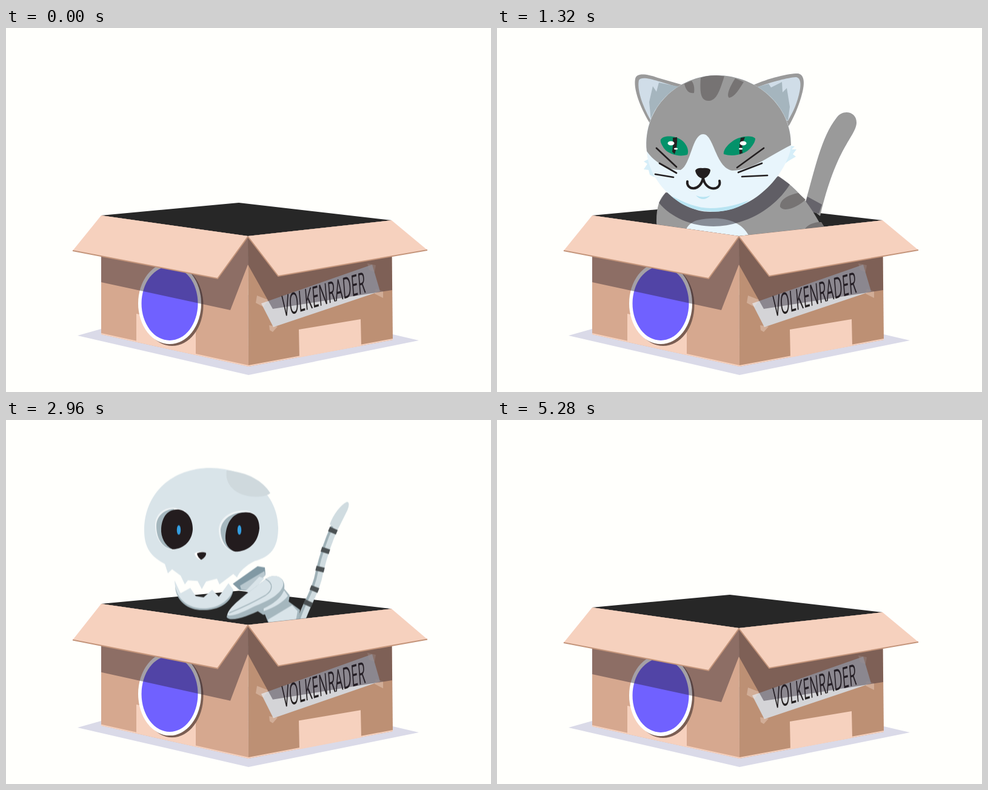
Animation, 800 px wide and 600 px high, one loop 5480 ms. Source, as an HTML page:

```html
<!DOCTYPE html>
<html lang="en">
<head>
<meta charset="utf-8">
<title>Cat in a box</title>
<style>
@property --s { syntax: "<number>"; inherits: true; initial-value: 1; }

html, body { margin: 0; width: 100%; height: 100%; overflow: hidden; background: #fffffc; }
svg { display: block; width: 800px; height: 600px; }

/* --s is the height of the box; .unbox undoes it for whoever sits inside */
svg, .anim { animation: 5480ms ease-in-out infinite; }
svg { animation-name: squash; }
.box { transform: scaleY(var(--s)); transform-origin: 0 558px; }
.unbox { transform: scaleY(calc(1 / var(--s))); transform-origin: 0 558px; }

/* paths morph between the shapes --a, --b and --m */
.flap { animation-name: flap; d: var(--a); }
.pose { animation-name: pose; d: var(--a); }
.bones { animation-name: bones; d: var(--a); }

.cat { animation-name: cat; }
.body { animation-name: body; transform-origin: 350px 320px; }
.head { animation-name: head; transform-origin: 346px 194px; }
.stripes { animation-name: stripes; transform-origin: 350px 80px; }
.gaze { animation-name: gaze; }
.pupil { animation-name: squint; transform-origin: 346px 194px; }
.skel { animation-name: skel; }
.skull { animation-name: skull; transform-origin: 338px 88px; }
.face { animation-name: face; }
.jaw { animation-name: jaw; }
.look { animation-name: look; transform-origin: 335px 200px; }

@keyframes squash {
  0%, 0.73% { --s: 1 }
  2.19% { --s: .97 }
  3.8% { --s: 1.04 }
  5.2% { --s: 1 }
  7.3% { --s: .956 }
  9.5% { --s: .975 }
  11.7%, 31% { --s: 1 }
  34.3% { --s: .965 }
  37.6% { --s: 1.04 }
  40.15% { --s: 1.024 }
  42.4% { --s: .975 }
  44.5%, 47.4% { --s: 1 }
  48.9% { --s: .97 }
  50.7% { --s: 1.04 }
  54% { --s: 1.024 }
  57%, 88.3% { --s: 1 }
  90.5% { --s: .97 }
  92.7% { --s: 1.035 }
  94.9% { --s: .98 }
  96.35%, 100% { --s: 1 }
}
@keyframes flap {
  0%, 1.5% { d: var(--a) }
  4% { d: var(--b) }
  7%, 33.5% { d: var(--a) }
  37.8% { d: var(--b) }
  40.15% { d: var(--m) }
  41.6%, 48.5% { d: var(--a) }
  51% { d: var(--b) }
  54%, 90.5% { d: var(--a) }
  92.7% { d: var(--b) }
  95.5%, 100% { d: var(--a) }
}
@keyframes pose {
  0%, 8.8% { d: var(--a) }
  20%, 31.4% { d: var(--b) }
  39.5%, 100% { d: var(--m) }
}
@keyframes cat {
  0%, 1.8% { transform: translateY(300px); animation-timing-function: ease-in }
  3.3% { transform: translateY(110px); animation-timing-function: ease-out }
  4.9% { transform: translateY(-32px) }
  7.3%, 31.4% { transform: none }
  34.3% { transform: translateY(12px) }
  38% { transform: translateY(-39px) }
  40.15%, 40.9% { transform: translateY(-42px); animation-timing-function: ease-in }
  44.5%, 100% { transform: translateY(300px) }
}
@keyframes body {
  0%, 8.8% { transform: translate(3px, 6px) rotate(-4deg) }
  20%, 31.4% { transform: none }
  39.5%, 100% { transform: translateX(2px) }
}
@keyframes head {
  0%, 8.8% { transform: translate(-11.5px, 8px) rotate(-4.5deg) }
  20%, 31.4% { transform: none }
  39.5%, 100% { transform: translate(6px, 7.5px) scaleY(.98) }
}
@keyframes stripes {
  0%, 8.8% { transform: scaleY(1.18) }
  20%, 31.4% { transform: none }
  39.5%, 100% { transform: scaleY(.92) }
}
@keyframes gaze {
  0%, 31.4% { transform: none }
  39.5%, 100% { transform: translateY(-13px) }
}
@keyframes squint {
  0%, 31.4% { transform: none }
  39.5%, 100% { transform: scaleY(.66) }
}
@keyframes skel {
  0%, 48.2% { transform: translateY(300px); animation-timing-function: ease-in }
  49.6% { transform: translateY(120px); animation-timing-function: ease-out }
  51.3% { transform: translateY(-15px) }
  54% { transform: translateY(-7px) }
  57%, 88.3% { transform: none }
  90.2% { transform: translateY(8px) }
  92.3%, 92.8% { transform: translateY(-14px); animation-timing-function: ease-in }
  96.3%, 100% { transform: translateY(300px) }
}
@keyframes skull {
  0%, 54% { transform: translateY(-2px) scaleY(.965) }
  57.6% { transform: none }
  62% { transform: rotate(1.4deg) }
  67%, 78% { transform: none }
  82% { transform: rotate(1.6deg) }
  87%, 100% { transform: none }
}
@keyframes face {
  0%, 54% { transform: translateY(-4px) }
  57.6%, 100% { transform: none }
}
@keyframes jaw {
  0%, 54% { transform: translateY(3px) }
  57.6%, 70.1% { transform: none }
  72% { transform: translateY(-2px) }
  74% { transform: translateY(2px) }
  76%, 100% { transform: none }
}
@keyframes look {
  0%, 54% { transform: translateY(-2px) scaleY(.82) }
  57.6%, 70.1% { transform: none }
  73%, 76% { transform: translateX(4px) }
  79%, 100% { transform: none }
}
@keyframes bones {
  0%, 54% { d: var(--b) }
  62% { d: var(--a) }
  66% { d: var(--b) }
  70.1% { d: var(--a) }
  78% { d: var(--b) }
  85%, 100% { d: var(--a) }
}

.paper { fill: #f6d1be }
.shade { fill: rgb(40 30 45 / .42) }
.edge { stroke: #c4957b; stroke-width: 2; fill: none }
.fur { fill: #9a9a9a }
.stripe { fill: #767373 }
.inner { fill: #d0dde8 }
.tuft { fill: #a5b5be }
.white { fill: #e8f5fc }
.chin { fill: #b8e4f2 }
.ink { fill: #231f20 }
.line { fill: none; stroke: #231f20; stroke-linecap: round }
.bone { fill: #d9e4e9 }
.dim { fill: #a5b7be }
.socket { fill: #231c1e }
.glow { fill: #349ee0 }
.shine { fill: #fff }
</style>
</head>
<body>
<svg viewBox="0 0 800 600">
  <clipPath id="rim"><path d="M0-300H800V317H636L399 343 157 309H0Z"/></clipPath>

  <path fill="#dadae8" d="M118 507 157 496 400 440 638 505 681 515 400 572Z"/>

  <g class="box">
    <path fill="#272727" d="M157 309 384 288 636 317 399 343Z"/>

    <g clip-path="url(#rim)"><g class="unbox">
      <g class="anim cat">
        <path class="anim pose fur" style="
          --a:path('M492 275C510 225 540 180 567 160C585 148 606 163 598 180C590 196 545 215 518 295Z');
          --b:path('M508 290C525 230 535 180 560 148C570 133 594 137 593 157C591 180 560 195 533 310Z');
          --m:path('M518 342C540 272 560 212 569 168C572 146 598 146 597 168C596 202 570 272 540 352Z')"/>
        <path class="anim pose" fill="#66646b" style="
          --a:path('M494 300L516 310L512 325L490 318Z');
          --b:path('M512 278L536 291L531 306L505 300Z');
          --m:path('M531 298L553 314L541 347L518 332Z')"/>
        <g class="anim body">
          <path class="fur" d="M275 420 270 365C258 320 262 285 278 272L465 245C505 270 530 310 556 372L565 420Z"/>
          <path class="stripe" d="M467 295C466 283 480 275 497 272L509 283C500 292 475 306 467 295ZM505 339C506 327 521 319 535 320L547 339C531 349 507 353 505 339Z"/>
          <path class="white" d="M303 366C306 340 312 322 330 317C370 308 402 318 414 340C420 355 430 366 436 372L400 420H310Z"/>
          <path fill="rgb(40 36 50 / .5)" d="M267 288C295 322 350 337 400 320C440 308 468 282 483 258L464 244 278 271Z"/>
        </g>
        <g class="anim head">
          <path class="anim pose fur" style="
            --a:path('M254 160C232 135 220 108 222 89C223 80 240 79 262 85L308 95L300 160Z');
            --b:path('M254 160C235 130 225 100 228 84C230 74 245 75 265 82L310 95L300 160Z');
            --m:path('M252 160C240 125 241 95 244 80C246 73 256 75 268 81L308 97L300 160Z')"/>
          <path class="anim pose inner" style="
            --a:path('M254 153C234 130 225 106 228 93C235 86 262 91 302 100L280 155Z');
            --b:path('M254 153C238 125 231 100 234 86C240 77 265 88 302 98L280 155Z');
            --m:path('M257 150C248 125 248 95 251 82C257 78 270 86 300 101L280 155Z')"/>
          <path class="anim pose tuft" style="
            --a:path('M254 152L239 134L256 120L243 110L262 104L302 100L280 155Z');
            --b:path('M254 152L251 122L257 96L263 105L267 90L302 97L280 155Z');
            --m:path('M257 149L258 120L263 98L268 106L275 92L300 102L280 155Z')"/>
          <path class="anim pose fur" style="
            --a:path('M420 98C455 84 485 80 500 80C511 81 512 94 508 111C502 135 492 150 483 162L440 150Z');
            --b:path('M420 95C450 82 480 75 496 75C506 76 508 88 504 105C498 130 488 150 481 162L440 150Z');
            --m:path('M415 106C450 92 495 90 508 96C522 103 518 113 508 125C498 138 490 150 483 166L440 150Z')"/>
          <path class="anim pose inner" style="
            --a:path('M428 101C458 90 485 86 497 86C506 87 506 100 502 115C497 134 490 143 482 154L445 145Z');
            --b:path('M428 98C455 88 480 82 493 81C502 82 502 95 498 110C493 130 487 140 480 153L445 145Z');
            --m:path('M428 106C455 96 490 96 503 101C514 107 511 113 503 122C495 132 489 142 482 156L445 145Z')"/>
          <path class="anim pose tuft" style="
            --a:path('M430 100L450 96L453 103L472 93L474 110L480 104L485 132L482 153L445 145Z');
            --b:path('M430 97L448 92L452 98L470 89L471 106L478 99L483 130L480 152L445 145Z');
            --m:path('M430 106L450 102L455 109L472 101L474 118L482 108L484 134L482 154L445 145Z')"/>
          <path fill="#d6eef8" d="M250 216l-8 4 6 4-6 9 8 1 2 8 8 4ZM482 194l9 1-5 5 8 0-6 8 5 4-12 7-8 6Z"/>
          <path class="white" d="M247 200C240 130 300 78 362 78C430 78 488 130 485 196C480 232 432 303 352 303C300 303 247 250 247 200Z"/>
          <path class="anim pose chin" style="
            --a:path('M288 277C310 288 330 297 352 297C378 297 400 290 416 284C385 310 322 310 288 277Z');
            --b:path('M288 277C310 288 330 297 352 297C378 297 400 290 416 284C385 310 322 310 288 277Z');
            --m:path('M281 273C310 283 330 289 341 290C360 287 400 279 422 279C390 310 316 312 281 273Z')"/>
          <path class="anim pose fur" style="
            --a:path('M247 203C255 215 273 241 301 241C320 232 322 181 340 181C358 181 362 240 391 244C422 243 452 212 485 193C486 130 430 78 362 78C300 78 240 130 247 203Z');
            --b:path('M247 203C255 215 275 234 303 234C320 225 322 175 340 175C358 175 360 230 388 235C420 235 450 210 485 193C486 130 430 78 362 78C300 78 240 130 247 203Z');
            --m:path('M247 209C255 217 275 227 300 225C320 218 322 171 340 171C358 171 358 224 388 227C420 227 450 211 485 197C486 130 430 78 362 78C300 78 240 130 247 209Z')"/>
          <path class="anim stripes stripe" d="M336 82C334 110 337 120 350 120C362 119 367 105 375 79.500C360 77.500 348 77.500 336 82ZM309 92C312 105 318 108 325 107C326 98 325 93 321 87ZM393 83C383 98 378 112 383 115C392 114 400 100 407 89Z"/>
          <g class="anim gaze">
            <path class="chin" d="M328 276Q340 281 352 276Q340 288 328 276Z"/>
            <path class="anim pose" fill="#04926a" style="
              --a:path('M270 184C274 174 296 175 307 185C315 193 318 204 313 210C300 214 282 211 275 200C271 193 269 188 270 184ZM426 181C420 174 400 176 387 186C377 194 371 203 373 208C388 215 410 211 419 201C424 194 427 187 426 181Z');
              --b:path('M270 184C275 176 295 177 306 186C314 193 317 203 314 209C300 213 283 208 276 199C272 193 269 188 270 184ZM426 182C420 176 400 178 388 187C378 194 373 203 374 208C390 213 410 208 418 198C423 192 426 187 426 182Z');
              --m:path('M271 182C281 180 300 187 308 194C313 199 316 203 315 207C305 208 290 203 281 194C275 190 271 186 271 182ZM426 184C416 182 398 186 388 192C380 198 375 202 374 205C388 208 405 205 414 199C421 194 426 188 426 184Z')"/>
            <g class="anim pupil">
              <path class="ink" d="M290 181 297 180Q298 195 293 208L289 204Q291 193 290 181ZM402 181 409 180Q402 195 405 206L400 208Q399 194 402 181Z"/>
              <g class="shine">
                <ellipse cx="287" cy="190" rx="5.5" ry="3.5"/><ellipse cx="295" cy="199" rx="3" ry="1.5"/>
                <ellipse cx="406" cy="190" rx="5.5" ry="3.5"/><ellipse cx="402" cy="199" rx="3" ry="1.5"/>
              </g>
            </g>
            <path class="ink" d="M327 235Q330 230 339 231Q349 230 352 234C352 241 345 248 340 248C334 248 328 242 327 235Z"/>
            <path class="line" stroke-width="4" d="M314 253C312 267 335 271 340 247C344 271 371 268 367 252"/>
            <path class="anim pose line" stroke-width="2.7" style="
              --a:path('M263 210L296 229M268 232L296 238M261 248L291 245M396 231L441 203M398 239L438 228M404 246L446 248');
              --b:path('M263 198L296 229M268 223L296 239M261 241L291 246M396 230L440 198M398 238L437 223M404 245L446 243');
              --m:path('M263 198L296 229M266 223L295 238M260 238L290 245M396 231L440 197M398 238L438 222M404 247L445 240')"/>
          </g>
        </g>
      </g>

      <g class="anim skel">
        <g fill="none" stroke-width="13" style="
          --a:path('M489 336C492 304 502 282 515 257C528 234 537 215 546 185');
          --b:path('M487 337C497 307 512 287 517 257C523 232 531 207 542 183')">
          <path class="anim bones" stroke="#d0dce0"/>
          <path class="anim bones" stroke="#9fb1b7" stroke-width="4" transform="translate(-4 -1)"/>
          <path class="anim bones" stroke="#4b5153" stroke-width="14" stroke-dasharray="0 26 8 18 8 26 8 24 8 27 8 999"/>
        </g>
        <path class="anim bones" fill="#d0dce0" style="
          --a:path('M539 184C543 165 549 148 555 141C560 137 562 144 561 152L553 188Z');
          --b:path('M534 179C540 162 552 147 562 142C567 141 566 149 563 156L548 186Z')"/>
        <path class="dim" d="M425 322 466 306 485 320 478 360 440 360Z"/>
        <path class="bone" d="M432 336 472 312 481 322 474 360 440 360Z"/>
        <path class="dim" d="M415 322 458 284 468 296 466 308Q450 324 424 328Z"/>
        <path class="bone" d="M425 315 459 288 465 297Q452 313 425 322Z"/>
        <path fill="#8199a4" d="M374 277 415 248 427 250 428 262 401 289 385 287Z"/>
        <path fill="#b9c8cf" d="M386 280 426 256 428 263 401 289 388 286Z"/>
        <path class="bone" d="M395 289 418 265 426 268 403 293Z"/>
        <path class="dim" d="M364 332C366 318 382 306 395 295L430 268C445 258 462 268 459 285C456 300 440 311 420 320C400 330 370 341 364 332Z"/>
        <path class="bone" d="M365 328C368 316 383 306 395 295L430 268C445 258 460 268 457 280C452 296 430 306 410 314C394 322 372 333 365 328Z"/>
        <path fill="none" stroke="#a5b7be" stroke-width="1.5" d="M428 269C442 276 440 288 428 296Q400 312 368 325"/>

        <g class="anim skull">
          <g class="anim jaw">
            <path class="bone" d="M278 277 288 299 304 290 313 304 326 306 340 293 351 305 367 282 375 293C370 315 350 327 325 327C298 327 279 310 278 277Z"/>
            <path class="dim" d="M279 287C284 312 302 324 325 325C350 325 368 312 375 293C372 316 350 328 325 328C300 328 280 312 279 287Z"/>
          </g>
          <path class="bone" d="M228 195C228 130 275 88 337 88C402 88 449 135 449 190C449 225 436 240 410 247C395 255 385 265 381 275L375 269 352 287 348 277 330 282 323 295 316 281 300 280 295 287 288 272 274 261 267 268 262 252C240 240 228 225 228 195Z"/>
          <path fill="#cfd9dd" d="M364 92C360 115 378 137 412 137C425 137 433 134 436 131C423 110 400 96 364 92Z"/>
          <g class="anim face">
            <path fill="#eef3f5" d="M246 190C246 170 262 158 279 160L296 165 277 233C255 229 246 210 246 190ZM351 195C354 173 376 163 398 165L410 170 378 236C360 232 350 215 351 195Z"/>
            <path class="dim" d="M248 191C248 173 263 162 277 162L275 231C256 228 248 210 248 191ZM354 197C357 177 376 167 395 168L378 235C363 232 354 215 354 197Z"/>
            <path class="socket" d="M256 195C258 175 266 163 284 163C300 165 308 180 308 197C307 215 295 230 275 231C262 225 255 210 256 195ZM362 212C362 190 372 168 393 168C412 166 418 180 418 195C416 220 400 235 378 235C370 232 362 225 362 212Z"/>
            <g class="anim look glow">
              <ellipse cx="285" cy="200" rx="3.2" ry="10"/><ellipse cx="385" cy="200" rx="3.2" ry="10"/>
            </g>
            <path class="shine" d="M311 238Q318 233 326 236L320 249Q312 245 311 238Z"/>
            <path class="socket" d="M315 238Q322 234 330 237Q331 243 322 249Q316 245 315 238Z"/>
          </g>
        </g>
      </g>
    </g></g>

    <path fill="#d6a88f" d="M157 309 399 343 400 558 157 505Z"/>
    <path fill="#bd9074" d="M399 343 636 317 638 514 400 558Z"/>
    <path class="paper" d="M215 471 313 492V539L215 517ZM483 497 585 480 586 524 484 543Z"/>
    <path fill="none" stroke="#f6d1be" stroke-width="2" d="M157 504 400 557 638 513"/>

    <ellipse cx="274" cy="457" rx="51.5" ry="67" fill="#7a5e53"/>
    <ellipse cx="270" cy="454" rx="52" ry="67" fill="#fff"/>
    <ellipse cx="270" cy="454" rx="46.5" ry="61" fill="#7061ff"/>

    <path fill="#d4d4d7" d="M421 454 604 390 617 434 441 493Z"/>
    <path fill="rgb(245 225 215 / .35)" d="M414 441 432 448 425 460 412 453ZM434 490 448 492 440 501 435 498ZM596 388 610 391 608 402 599 399ZM610 430 622 434 622 445 608 438Z"/>
    <text transform="matrix(.41 -.12 .08 1 457 476)" font-family="'Open Sans', 'Noto Sans', sans-serif" font-size="48" fill="#231f20">VOLKENRADER</text>

    <path class="anim flap shade" style="
      --a:path('M157 309L399 343L399 390L370 465L157 419Z');
      --m:path('M157 309L399 343L399 391L355 454L157 413Z');
      --b:path('M157 309L399 343L399 391L337 442L157 405Z')"/>
    <path class="anim flap shade" style="
      --a:path('M399 343L636 317L637 432L440 463L399 390Z');
      --m:path('M399 343L636 317L637 424L457 453L399 391Z');
      --b:path('M399 343L636 317L637 415L474 443L399 391Z')"/>
    <path class="anim flap paper" style="
      --a:path('M157 309L399 343L349 413L110 367Z');
      --m:path('M157 309L399 343L337 402L104 358Z');
      --b:path('M157 309L399 343L321 389L94 346Z')"/>
    <path class="anim flap paper" style="
      --a:path('M399 343L636 317L695 366L449 409Z');
      --m:path('M399 343L636 317L697 360L459 397Z');
      --b:path('M399 343L636 317L699 351L471 383Z')"/>
    <path class="anim flap edge" style="
      --a:path('M110 367L349 413L399 344');
      --m:path('M104 358L337 402L399 344');
      --b:path('M94 346L321 389L399 344')"/>
    <path class="anim flap edge" style="
      --a:path('M695 366L449 409L399 344');
      --m:path('M697 360L459 397L399 344');
      --b:path('M699 351L471 383L399 344')"/>
  </g>
</svg>
</body>
</html>
```
